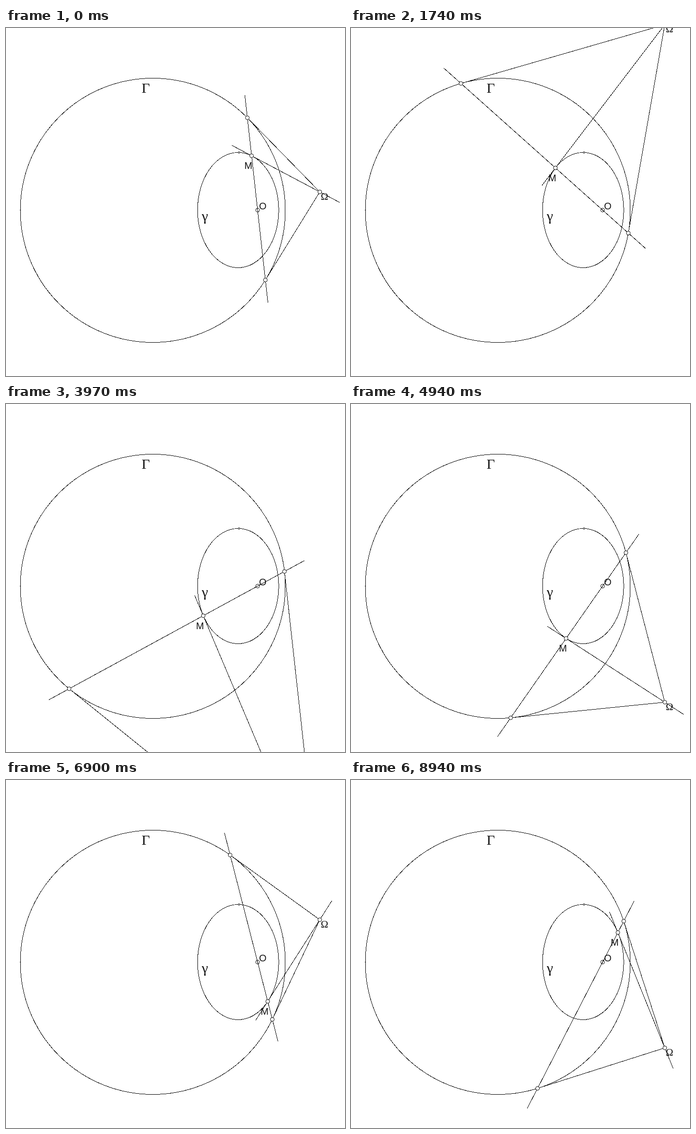
Write an HTML page that moves like this. It is 710 px wide and 731 px high and loops after 8990 ms.

```html
<!DOCTYPE html>
<html lang="en">
<head>
<meta charset="utf-8">
<title>Circle, ellipse and pole</title>
<style>
  html, body { margin: 0; width: 100%; height: 100%; overflow: hidden; background: #fff; }
  svg { display: block; width: 710px; height: 731px; }
  circle, ellipse, line { stroke: #000; stroke-width: 1; fill: none; shape-rendering: crispEdges; }
  .dot { fill: #fff; shape-rendering: auto; }
  text { fill: #111; }
  .sans { font: 20px "Liberation Sans", Arial, sans-serif; }
  .serif { font: 30px "Liberation Serif", "Times New Roman", serif; }
  .small { font-size: 21px; }
</style>
</head>
<body>
<svg viewBox="0 0 710 731">
  <circle cx="307.5" cy="383" r="277.5"/>
  <ellipse cx="486.2" cy="382.5" rx="85" ry="121"/>
  <circle class="dot" cx="488" cy="261.5" r="1.7"/>
  <circle class="dot" cx="527" cy="382.5" r="4"/>
  <line id="chord"/>
  <line id="tangent"/>
  <line id="sideP"/>
  <line id="sideQ"/>
  <circle class="dot" id="dotP" r="4"/>
  <circle class="dot" id="dotQ" r="4"/>
  <circle class="dot" id="dotM" r="4"/>
  <circle class="dot" id="dotW" r="4"/>
  <text class="serif" x="284" y="136">Γ</text>
  <text class="serif" x="410" y="405">γ</text>
  <text class="sans" x="530" y="381">O</text>
  <text class="sans" id="nameM">M</text>
  <text class="serif small" id="nameW">Ω</text>
</svg>
<script>
const LOOP = 8990, STEPS = 175, TAIL = 48;
const C = { x: 307.5, y: 383 }, R = 277.5;
const E = { x: 486, y: 382.5, rx: 85, ry: 121 };
const O = { x: 527, y: 382.5 };
const POLAR_X = 657.2;

// Steps that last 70 ms; all others last 50 ms.
const slow = [13, 27, 41, 54, 67, 80, 93, 106, 118, 134, 150, 166];
const starts = [];
for (let i = 0, t = 0; i < STEPS; i++) {
  starts.push(t);
  t += slow.includes(i) ? 70 : 50;
}

// Step and eccentric angle of M in degrees.
const keys = [[0, 70.5], [34, 132.9], [58, 176.6], [96, 245.3], [118, 287.7], [149, 344.4], [174, 390.9]];

function angleAt(step) {
  const k = Math.max(1, keys.findIndex(key => key[0] >= step));
  const [s0, a0] = keys[k - 1], [s1, a1] = keys[k];
  return (a0 + (a1 - a0) * (step - s0) / (s1 - s0)) * Math.PI / 180;
}

const $ = id => document.getElementById(id);

function set(id, attrs) {
  for (const name in attrs) $(id).setAttribute(name, attrs[name].toFixed(2));
}

const dot = (id, p) => set(id, { cx: p.x, cy: p.y });
const label = (id, p, dx, dy) => set(id, { x: p.x + dx, y: p.y + dy });

// Segment from a to b, lengthened at both ends.
function line(id, a, b, extra = 0) {
  const dx = b.x - a.x, dy = b.y - a.y, k = extra / Math.hypot(dx, dy);
  set(id, { x1: a.x - dx * k, y1: a.y - dy * k, x2: b.x + dx * k, y2: b.y + dy * k });
}

function draw(step) {
  const a = angleAt(step);
  const M = { x: E.x + E.rx * Math.cos(a), y: E.y - E.ry * Math.sin(a) };

  // Meet line OM with the big circle.
  const len = Math.hypot(M.x - O.x, M.y - O.y);
  const u = (M.x - O.x) / len, v = (M.y - O.y) / len;
  const b = (O.x - C.x) * u + (O.y - C.y) * v;
  const root = Math.sqrt(b * b + R * R - (O.x - C.x) ** 2 - (O.y - C.y) ** 2);
  const along = s => ({ x: O.x + u * s, y: O.y + v * s });
  const P = along(root - b), Q = along(-root - b);

  // Pole of the chord.
  const W = { x: POLAR_X, y: C.y - (POLAR_X - C.x) * u / v };

  line("chord", P, Q, TAIL);
  line("tangent", M, W, TAIL - 1);
  line("sideP", P, W);
  line("sideQ", Q, W);
  dot("dotP", P);
  dot("dotQ", Q);
  dot("dotM", M);
  dot("dotW", W);
  label("nameM", M, -15, 28);
  label("nameW", W, 2, 16.5);
}

let shown = -1;
function tick() {
  const t = performance.now() % LOOP;
  let step = STEPS - 1;
  while (starts[step] > t) step--;
  if (step !== shown) draw(shown = step);
  requestAnimationFrame(tick);
}
tick();
</script>
</body>
</html>
```
